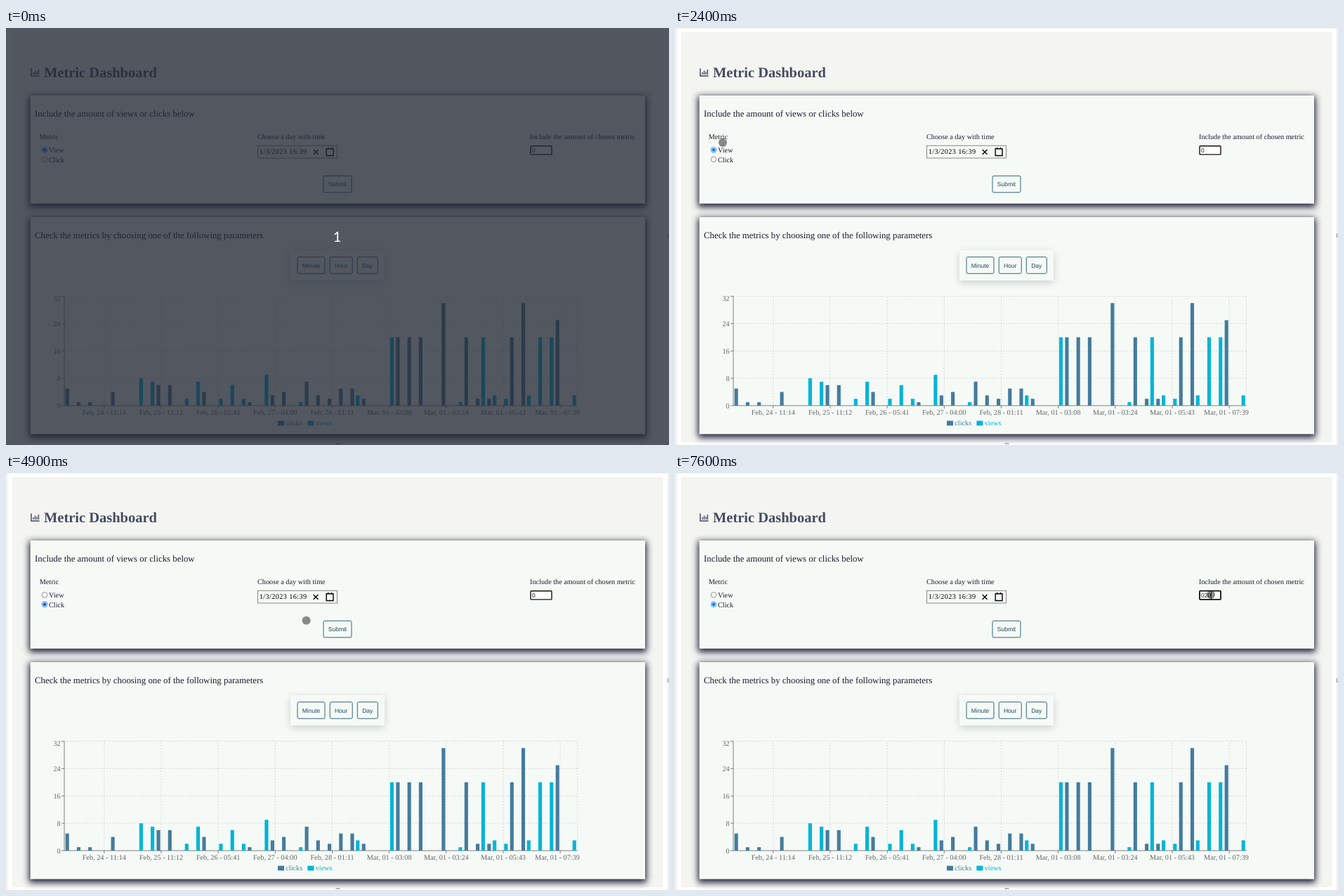
An HTML page that plays this animation: 944 px wide and 593 px high, repeating every 8000 ms.

```html
<!DOCTYPE html>
<html lang="en">
<head>
<meta charset="utf-8">
<title>Metric Dashboard</title>
<style>
  html, body { margin: 0; width: 100%; height: 100%; overflow: hidden; background: #f4f5f1; }
  svg { display: block; width: 944px; height: 593px; text-rendering: geometricPrecision; }
  text { font: 10.24px "Liberation Serif", "Times New Roman", serif; fill: #1b1d2e; }
  .title { font-size: 20.48px; font-weight: bold; fill: #454b62; }
  .lead { font-size: 12.84px; }
  .ui { font: 8.53px "Liberation Sans", Arial, sans-serif; fill: #1f4a60; }
  .axis { fill: #666; }
  .mid { text-anchor: middle; }
  .end { text-anchor: end; }
  .line { fill: none; stroke: #666; stroke-width: .8; }
  .grid { fill: none; stroke: #ccc; stroke-width: .7; stroke-dasharray: 2 2; }
  .button { fill: #f5faf6; stroke: #33647a; stroke-width: 1; }
  .count { font: 20px Lato, "DejaVu Sans", sans-serif; fill: #fff; text-anchor: middle; }
</style>
</head>
<body>
<svg id="stage" viewBox="0 0 944 593" xmlns="http://www.w3.org/2000/svg">
  <defs>
    <filter id="blur" x="-10%" y="-20%" width="120%" height="140%"><feGaussianBlur stdDeviation="4.8"/></filter>
    <filter id="soft" x="-30%" y="-60%" width="160%" height="220%"><feGaussianBlur stdDeviation="6"/></filter>
  </defs>
  <rect width="944" height="593" fill="#f4f5f2"/>
  <rect x="3.5" y="1" width="937.5" height="592" fill="#fff"/>
  <rect x="9" y="6" width="926.5" height="583" fill="#f4f5f1"/>

  <g fill="none" stroke="#454b62" stroke-width="1.5">
    <path d="M35.900 57.500v10.700h11.700"/>
    <path d="M39 63v3.200M41.500 60.500v5.700M44 62v4.200M46.400 59v7.200" stroke-width="1.4"/>
  </g>
  <text class="title" x="54" y="70">Metric Dashboard</text>

  <g id="panels"></g>
  <path d="M469.500 591h6M942.500 292v6" stroke="#b5b5b5" stroke-width="2"/>

  <text class="lead" x="41" y="126">Include the amount of views or clicks below</text>
  <text x="47.700" y="158">Metric</text>
  <text x="61" y="177.300">View</text>
  <text x="61" y="191">Click</text>
  <g id="radios"></g>

  <text x="358" y="158">Choose a day with time</text>
  <rect x="358.500" y="167.300" width="113" height="17.700" fill="none" stroke="#888" stroke-width="1"/>
  <text x="360.700" y="178.700" letter-spacing=".4" style="fill:#000">1/3/2023 16:39</text>
  <g fill="none" stroke="#000" stroke-width="1.4">
    <path d="M437.700 173l6.800 6.800M444.500 173l-6.800 6.800"/>
    <path d="M456.200 171.800h9.800v9.700h-9.800zM458.700 169.800v2M463.500 169.800v2"/>
  </g>

  <text x="746" y="158">Include the amount of chosen metric</text>
  <rect id="field" x="747" y="167.700" width="30" height="12.200" rx="1" fill="#fff" stroke="#111"/>
  <text id="amount" class="ui" x="749" y="176.800" style="fill:#222">0</text>
  <path id="caret" stroke="#000" stroke-width=".8"/>

  <text class="lead" x="41" y="299">Check the metrics by choosing one of the following parameters</text>
  <rect x="405" y="319" width="134" height="43" fill="#000" opacity=".17" filter="url(#soft)"/>
  <rect x="405" y="316" width="134" height="43" fill="#f5faf6"/>
  <g id="buttons"></g>
  <g id="chart"></g>

  <circle id="cursor" r="6" fill="#000" fill-opacity=".45"/>
  <g id="overlay">
    <rect width="944" height="593" fill="#252936" opacity=".78"/>
    <text class="count" x="471.500" y="303.700">1</text>
  </g>
</svg>
<script>
const LOOP = 8000;
const CLICK_COLOR = '#457b9d', VIEW_COLOR = '#00b4d8';
const el = id => document.getElementById(id);

function add(parent, tag, attrs, text) {
  const node = document.createElementNS('http://www.w3.org/2000/svg', tag);
  for (const key in attrs) node.setAttribute(key, attrs[key]);
  if (text) node.textContent = text;
  return parent.appendChild(node);
}

function panel(y, height) {
  const x = 34.7, width = 875.3, spread = 2;
  add(el('panels'), 'rect', {
    x: x - spread, y: y - spread + 3, width: width + 2 * spread, height: height + 2 * spread,
    fill: '#22223b', filter: 'url(#blur)'
  });
  add(el('panels'), 'rect', { x, y, width, height, fill: '#f5faf6' });
}

function button(label, x, y, width) {
  add(el('buttons'), 'rect', { class: 'button', x, y, width, height: 23.5, rx: 2 });
  add(el('buttons'), 'text', { class: 'ui mid', x: x + width / 2, y: y + 15 }, label);
}

function radio(cy) {
  const ring = add(el('radios'), 'circle', { cx: 55, cy, r: 3.8, fill: '#fff', 'stroke-width': .8 });
  const dot = add(el('radios'), 'circle', { cx: 55, cy, r: 2.4 });
  return (checked, color) => {
    ring.setAttribute('stroke', checked ? color : '#767676');
    dot.setAttribute('fill', checked ? color : 'none');
  };
}

function drawChart() {
  const chart = el('chart');
  const left = 83, base = 537, width = 730.5, unit = 4.86, band = width / 45;
  const dates = ['Feb, 24 - 11:14', 'Feb, 25 - 11:12', 'Feb, 26 - 05:41', 'Feb, 27 - 04:00', 'Feb, 28 - 01:11',
    'Mar, 01 - 03:08', 'Mar, 01 - 03:24', 'Mar, 01 - 05:43', 'Mar, 01 - 07:39'];
  // One entry per moment: clicks count up, views count down, a pair holds both
  const readings = [
    5, 1, 1, 0, 4, 0, -8, -7, 6, 6, -2, -7, 4, -2, -6, -2, 1, -9, 3, 4, -1, 7, 3, 2, 5, [5, -3], 2, 0,
    -20, 20, 20, 20, 0, 30, -1, 20, [2, -20], [2, -3], -2, 20, [30, -3], -20, -20, 25, -3
  ];

  for (let value = 0; value <= 32; value += 8) {
    const y = base - value * unit;
    if (value) add(chart, 'path', { class: 'grid', d: `M${left} ${y}h${width}` });
    add(chart, 'path', { class: 'line', d: `M${left - 4} ${y}h4` });
    add(chart, 'text', { class: 'axis end', x: 77.7, y: Math.max(y + 3.8, 388) }, String(value));
  }
  add(chart, 'path', { class: 'grid', d: `M${left + width} ${base}V381.5` });
  dates.forEach((date, i) => {
    const x = left + band * Math.min(i * 5 + 3.5, 44.5);
    add(chart, 'path', { class: 'grid', d: `M${x} ${base}V381.5` });
    add(chart, 'path', { class: 'line', d: `M${x} ${base}v4` });
    add(chart, 'text', { class: 'axis mid', x: Math.min(x, 785), y: 549.7 }, date);
  });
  add(chart, 'path', { class: 'line', d: `M${left} 381.5V${base}h${width}` });

  readings.forEach((entry, i) => [entry].flat().forEach(value => {
    const height = Math.abs(value) * unit;
    add(chart, 'rect', {
      x: left + band * i + (value < 0 ? 9.4 : 1.62), y: base - height, width: 5.12, height,
      fill: value < 0 ? VIEW_COLOR : CLICK_COLOR
    });
  }));

  const legend = (label, x, fill) => {
    add(chart, 'rect', { x, y: 558.6, width: 9, height: 6.8, fill });
    add(chart, 'text', { x: x + 11.3, y: 565, style: `fill:${fill}` }, label);
  };
  legend('clicks', 387, CLICK_COLOR);
  legend('views', 429.4, VIEW_COLOR);
}

panel(96, 153.7);
panel(269, 308.5);
button('Submit', 452, 210.3, 40);
button('Minute', 415, 325.7, 39);
button('Hour', 461.2, 325.7, 32);
button('Day', 500.3, 325.7, 29);
drawChart();
const setView = radio(173.3), setClick = radio(186.8);

const moves = [
  { start: 2000, end: 2400, x: 68, y: 163 },
  { start: 2700, end: 2900, x: 55, y: 185 },
  { start: 3300, end: 3400, x: 55, y: 187 },
  { start: 4300, end: 5000, x: 447, y: 211 },
  { start: 5100, end: 5400, x: 470, y: 222 },
  { start: 5600, end: 6200, x: 770, y: 172 },
  { start: 7000, end: 7200, x: 763, y: 173 }
];

function cursorAt(t) {
  let x = 58, y = 26;
  for (const move of moves) {
    const u = Math.min(Math.max((t - move.start) / (move.end - move.start), 0), 1);
    const ease = (1 - Math.cos(Math.PI * u)) / 2;
    x += (move.x - x) * ease;
    y += (move.y - y) * ease;
  }
  return [x, y];
}

function render(time) {
  const t = Math.floor(time % LOOP / 100) * 100;
  const show = (id, on) => { el(id).style.display = on ? '' : 'none'; };
  show('overlay', t < 100);
  show('cursor', t >= 2000);
  show('caret', t >= 7200);

  const [x, y] = cursorAt(t);
  el('cursor').setAttribute('cx', x);
  el('cursor').setAttribute('cy', y);

  const clicked = t >= 3700;
  setView(!clicked, '#0075ff');
  setClick(clicked, t < 3900 ? '#3793ff' : t < 6600 ? '#005cc8' : '#0075ff');

  const value = t >= 7600 ? '020' : t >= 7400 ? '02' : '0';
  el('amount').textContent = value;
  el('field').setAttribute('stroke-width', t >= 6600 ? 1.8 : 1.4);
  el('caret').setAttribute('d', `M${749.3 + value.length * 4.74} 169.3v9.4`);
}

function tick(now) {
  render(now);
  requestAnimationFrame(tick);
}
render(0);
requestAnimationFrame(tick);
</script>
</body>
</html>
```
